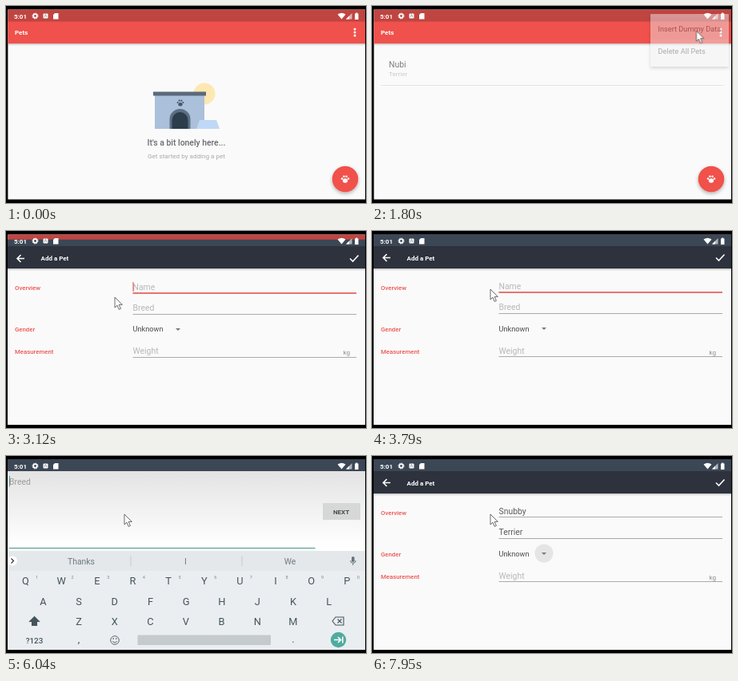
An HTML page that plays this animation: 450 by 247 pixels, repeating every 8000 ms.

```html
<!DOCTYPE html>
<html lang="en">
<head>
<meta charset="utf-8">
<title>Pets app</title>
<style>
html, body { margin: 0; width: 100%; height: 100%; overflow: hidden; background: #000; }
svg { display: block; width: 450px; height: 247px; font-family: Roboto, "Noto Sans", sans-serif; }
.s { font-size: 8.1px; }
.m { font-size: 9.2px; }
.l { font-size: 10.4px; }
.b { font-weight: 500; }
.bb { font-weight: 700; font-size: 8px; }
.mid { text-anchor: middle; }
.label { fill: #ec5652; font-size: 7.8px; font-weight: 500; }
.line { stroke: #aaa; stroke-width: 1; }
.icon { fill: none; stroke: #fff; stroke-width: 1.6; }
.key { font-size: 12.8px; fill: #46545c; text-anchor: middle; }

.anim { animation: 8s linear infinite both; }
#cursor { animation-name: cursor; }
#empty { animation-name: empty; }
#list { animation-name: list; }
#menu { animation-name: menu; }
.sheet { animation-name: sheet; transform-origin: 348px 10px; }
#items { animation-name: items; }
#tap { animation-name: tap; }
#press { animation-name: press; transform-origin: 424px 217px; }
#editor { animation-name: editor; }
#form { animation-name: form; }
#bar { animation-name: bar; transform-origin: 0 19px; }
#ime { animation-name: ime; }
#keys { animation-name: keys; }
#focus { animation-name: focus; transform-origin: 215px 122px; }

@keyframes cursor {
  0%, 1.62% { transform: translate(364px, 247px); animation-timing-function: ease-in-out; }
  7.63%, 10% { transform: translate(434px, 31px); }
  12.5% { transform: translate(426px, 35px); }
  19%, 21.5% { transform: translate(405px, 26px); animation-timing-function: ease-in-out; }
  30%, 32.2% { transform: translate(422px, 211px); animation-timing-function: ease-in-out; }
  39% { transform: translate(136px, 83px); }
  41.7% { transform: translate(143px, 76px); }
  42.9%, 100% { transform: translate(148px, 73px); }
}
@keyframes empty { 0%, 21.5% { opacity: 1; } 22.5%, 100% { opacity: 0; } }
@keyframes list { 0%, 21.5% { opacity: 0; } 23%, 100% { opacity: 1; } }
@keyframes menu {
  0%, 10% { opacity: 0; }
  12.4%, 21.5% { opacity: .96; }
  23.5%, 100% { opacity: 0; }
}
@keyframes sheet {
  0%, 10% { transform: translate(50px, 9px) scale(.5, .2); }
  12.5% { transform: translate(15px, 9px) scale(.867, .62); }
  15%, 100% { transform: none; }
}
@keyframes items { 0%, 12.5% { transform: translateY(-3px); } 15%, 100% { transform: none; } }
@keyframes tap { 0%, 17.5% { opacity: 0; } 19%, 21.5% { opacity: .1; } 23%, 100% { opacity: 0; } }
@keyframes press {
  0%, 31.5% { transform: scale(0); opacity: .25; }
  33.5% { transform: none; opacity: .25; }
  36%, 100% { transform: none; opacity: 0; }
}
@keyframes editor { 0%, 33% { opacity: 0; } 36%, 100% { opacity: 1; } }
@keyframes form {
  0%, 33% { transform: translateY(20px); animation-timing-function: ease-out; }
  36% { transform: translateY(5px); animation-timing-function: ease-out; }
  39% { transform: translateY(1px); }
  41.6%, 100% { transform: none; }
}
@keyframes bar { 0%, 36.5% { transform: scaleY(0); } 39% { transform: scaleY(.55); } 41.6%, 100% { transform: none; } }
@keyframes ime {
  0%, 49.2% { opacity: 0; }
  50.3% { opacity: .98; }
  51.1%, 96% { opacity: 1; }
  97.8%, 100% { opacity: 0; }
}
@keyframes keys {
  0%, 49.2% { transform: translateY(125px); }
  50.2%, 96% { transform: none; }
  98.5%, 100% { transform: translateY(125px); }
}
@keyframes focus {
  0%, 96.5% { transform: scale(.5); opacity: 0; }
  99%, 100% { transform: none; opacity: 1; }
}
</style>
</head>
<body>
<svg viewBox="0 0 450 247">
  <defs>
    <clipPath id="screen"><rect x="2.400" y="4.500" width="446.600" height="237.900"/></clipPath>
    <clipPath id="reveal"><rect class="anim sheet" x="348" y="10" width="98" height="66"/></clipPath>
    <linearGradient id="shade" x2="0" y2="1">
      <stop stop-opacity=".22"/><stop offset="1" stop-opacity="0"/>
    </linearGradient>
    <linearGradient id="page" x2="0" y2="1">
      <stop stop-color="#e3e3e3"/><stop offset=".9" stop-color="#fefefe"/>
    </linearGradient>
    <filter id="drop" x="-30%" y="-30%" width="160%" height="170%">
      <feDropShadow dx="0" dy="2" stdDeviation="2" flood-opacity=".3"/>
    </filter>
    <g id="paw">
      <ellipse cy="2" rx="3.1" ry="2.7"/>
      <circle cx="-4" cy="-.6" r="1.25"/><circle cx="-1.6" cy="-3.3" r="1.3"/>
      <circle cx="1.6" cy="-3.3" r="1.3"/><circle cx="4" cy="-.6" r="1.25"/>
    </g>
  </defs>

  <g clip-path="url(#screen)">
    <rect width="450" height="247" fill="#fafafa"/>
    <rect y="47" width="450" height="3" fill="url(#shade)"/>
    <rect y="19" width="450" height="28" fill="#f0514c"/>
    <text class="bb" x="11" y="36" fill="#fff">Pets</text>
    <g fill="#fff">
      <circle cx="436" cy="29" r="1.5"/><circle cx="436" cy="33" r="1.5"/><circle cx="436" cy="37" r="1.5"/>
    </g>

    <g id="empty" class="anim">
      <circle cx="248" cy="110" r="13.5" fill="#fde8b1"/>
      <path d="M186 112h62v42h-62z" fill="#abc0da"/>
      <path d="M184 107.500h66v5h-66z" fill="#5a6a7b"/>
      <path d="M204.500 154v-12a13 13 0 0 1 26 0v12z" fill="#5d6f82"/>
      <path d="M207.500 154v-11a10 10 0 0 1 20 0v11z" fill="#2c3d4c"/>
      <use href="#paw" transform="translate(218 121.500) scale(.85)" fill="#465768"/>
      <path d="M242 143h21l4 11h-29z" fill="#bfd8f5"/>
      <text class="mid b" x="225.500" y="175" font-size="10.4" fill="#6a6a70">It's a bit lonely here...</text>
      <text class="s mid" x="225.500" y="191" fill="#a9a9a9">Get started by adding a pet</text>
    </g>

    <g id="list" class="anim">
      <text class="l" x="21" y="76.500" fill="#444">Nubi</text>
      <text class="s" x="21" y="88" fill="#b4b4b4">Terrier</text>
      <path d="M11 99.500H440" stroke="#dcdcdc"/>
    </g>

    <circle cx="424" cy="217" r="16.3" fill="#f0514c" filter="url(#drop)"/>
    <use href="#paw" transform="translate(424 217)" fill="#fff"/>
    <circle id="press" class="anim" cx="424" cy="217" r="16.3" fill="#fff"/>

    <rect y="4" width="450" height="15" fill="#bf4541"/>

    <g id="editor" class="anim">
      <rect y="19" width="450" height="228" fill="#fafafa"/>
      <rect y="47" width="450" height="3" fill="url(#shade)"/>
      <rect y="19" width="450" height="28" fill="#2d323d"/>
      <g id="form" class="anim">
        <path class="icon" d="M23 33.500H14.500M18.500 29l-4.500 4.500 4.500 4.500"/>
        <text class="bb" x="43.500" y="36.500" fill="#fff">Add a Pet</text>
        <path class="icon" d="M430 33.500l3.500 3.500 7-7.500"/>
        <text class="label" x="11" y="73.500">Overview</text>
        <text class="label" x="11" y="125.500">Gender</text>
        <text class="label" x="11" y="153.500">Measurement</text>
        <text id="name" class="l" x="158.500" y="73"></text>
        <path class="line" d="M158.500 76.500H438"/>
        <path id="nameLine" d="M158.500 77H438" stroke="#ef5350" stroke-width="1.4"/>
        <path id="nameCaret" d="M159 63v12" stroke="#d94a46"/>
        <text id="breed" class="l" x="158.500" y="99"></text>
        <path class="line" d="M158.500 103.500H438"/>
        <circle id="focus" class="anim" cx="215" cy="122" r="11.5" fill="#e5e5e5"/>
        <text class="m" x="158.500" y="125.500" fill="#4c4c4c">Unknown</text>
        <path d="M212 121h6l-3 3z" fill="#777"/>
        <text class="l" x="158.500" y="153.500" fill="#b8b8b8">Weight</text>
        <text class="s" x="421.500" y="154.500" fill="#8c8c8c">kg</text>
        <path class="line" d="M158.500 157.500H438"/>
      </g>
    </g>
    <rect id="bar" class="anim" y="4" width="450" height="15" fill="#3c4755"/>

    <g id="ime" class="anim">
      <rect y="19" width="450" height="100" fill="url(#page)"/>
      <rect y="119" width="450" height="125" fill="#eaeef1"/>
      <text id="entry" class="l" x="4" y="36"></text>
      <path id="caret" d="M0 25v13.500" stroke="#4f9f93"/>
      <path d="M4 115.500H386.500" stroke="#459488"/>
      <rect x="396" y="59" width="47" height="21" rx="1" fill="#d6d8d8"/>
      <text class="bb mid" x="419" y="72.500" fill="#4a4a4a">NEXT</text>
    </g>
    <g id="keys" class="anim">
      <rect y="119" width="450" height="125" fill="#eaeef1"/>
      <rect y="119" width="450" height="25" fill="#e4e8eb"/>
      <path d="M156 125v13M295 125v13" stroke="#c6ccd0"/>
      <circle cx="8" cy="131.500" r="6" fill="#fff"/>
      <path d="M6.500 128.500l3 3-3 3" fill="none" stroke="#333" stroke-width="1.2"/>
      <rect x="432" y="126" width="3.6" height="7" rx="1.8" fill="#66747c"/>
      <path d="M430.500 131a3.300 3.300 0 0 0 6.600 0M433.800 134.500v2.500" fill="none" stroke="#66747c"/>
      <path id="shift" d="M35.500 201.500l6 6h-3v5h-6v-5h-3z" stroke="#46545c" stroke-width="1.1"/>
      <path d="M408 207l4-5h10v10h-10zM414.500 204.500l5 5M419.500 204.500l-5 5" fill="none" stroke="#46545c" stroke-width="1.1"/>
      <text class="mid b" x="35.500" y="234.500" font-size="9.8" fill="#46545c">?123</text>
      <text class="key" x="91" y="234">,</text>
      <text class="key" x="359" y="234">.</text>
      <g fill="none" stroke="#5b6970">
        <circle cx="136" cy="231" r="5.3"/><path d="M133 232.500q3 3 6 0"/>
      </g>
      <path d="M133.500 229h1.500M137 229h1.500" stroke="#5b6970" stroke-width="1.4"/>
      <rect x="164.500" y="224.500" width="166.500" height="12.500" rx="1" fill="#c5cacd"/>
      <circle cx="415.500" cy="230.500" r="9.7" fill="#50ab9f"/>
      <path class="icon" d="M410 230.500h8M415 227l3.500 3.500-3.500 3.500M420.800 226.500v8"/>
    </g>

    <g fill="#fff">
      <text class="bb" x="10" y="15.500">5:01</text>
      <circle cx="36.500" cy="12.500" r="2.3" fill="none" stroke="#fff" stroke-width="1.8"/>
      <circle cx="36.500" cy="12.500" r="3.500" fill="none" stroke="#fff" stroke-dasharray="1.4 1.35"/>
      <rect x="46.500" y="9.500" width="6" height="6" rx="1"/>
      <path d="M48 14l1.500-3.500L51 14" fill="none" stroke="#888" stroke-width=".8"/>
      <path d="M61 9h4.500v7.500h-6.500v-5.500z"/>
      <path d="M414.500 10.500q5-3.500 10 0l-5 6z"/>
      <path d="M432.500 9v7.500H425z" opacity=".6"/><path d="M429 12.500v4h-4z"/>
      <path d="M436 9.500h1.200v-1h2.100v1h1.200v7.500h-4.500z"/>
    </g>

    <g id="menu" class="anim">
      <rect class="anim sheet" x="348" y="10" width="98" height="66" fill="#f5f2f2" filter="url(#drop)"/>
      <g clip-path="url(#reveal)">
        <rect id="tap" class="anim" x="348" y="14" width="98" height="28"/>
        <g id="items" class="anim" fill="#555">
          <text class="m" x="357.500" y="32">Insert Dummy Data</text>
          <text class="m" x="357.500" y="60">Delete All Pets</text>
        </g>
      </g>
    </g>
  </g>
  <path id="cursor" class="anim" d="M0 0V13L3 10.200 5.200 15.400 7.400 14.400 5.200 9.400H9.300Z" fill="#fff" stroke="#444" stroke-width=".8"/>
</svg>
<script>
const $ = id => document.getElementById(id);

function addText(cls, x, y, text) {
  const el = document.createElementNS('http://www.w3.org/2000/svg', 'text');
  el.setAttribute('class', cls);
  el.setAttribute('x', x);
  el.setAttribute('y', y);
  el.textContent = text;
  $('keys').append(el);
  return el;
}

// Keyboard: [letters, first x, baseline]
const letters = [];
for (const [row, x, y] of [['qwertyuiop', 24.5, 161], ['asdfghjkl', 46.5, 186.5], ['zxcvbnm', 91, 211.5]])
  [...row].forEach((c, i) => letters.push(addText('key', x + i * 44.65, y, c)));
for (let i = 0; i < 10; i++) {
  const digit = addText('mid', 38.5 + i * 44.65, 153.5, (i + 1) % 10);
  digit.setAttribute('font-size', 5.6);
  digit.setAttribute('fill', '#7d8990');
}
const chips = [94, 224.5, 355].map(x => {
  const chip = addText('l mid', x, 135.5, '');
  chip.setAttribute('fill', '#6c7a82');
  return chip;
});

const nameField = {
  word: 'Snubby', hint: 'Name',
  times: [3790, 4240, 4590, 4710, 4910, 5090],
  tips: ['', 'S So Sorry', 'Sn Snow Snap', 'Snu Snug Snub', 'Snub Snubs Snug', 'Snubb Snubs Snub', 'Snubby Snubs Snug']
};
const breedField = {
  word: 'Terrier', hint: 'Breed',
  times: [6540, 6690, 6790, 6940, 7020, 7130, 7250],
  tips: ['Thanks I We', 'T The This', 'Te Tell Ten', 'Ter Term Terms', 'Terr Terry Terror',
    'Terri Terrier Terrible', 'Terrie Terrier Terriers', 'Terrier Terriers Terrain']
};

const setText = (el, text) => { if (el.textContent !== text) el.textContent = text; };
const show = (el, on) => el.setAttribute('visibility', on ? 'visible' : 'hidden');

function fill(el, field, count, hintColor) {
  setText(el, count ? field.word.slice(0, count) : field.hint);
  el.setAttribute('fill', count ? '#5c5c5c' : hintColor);
}

function draw(t) {
  const count = field => field.times.filter(s => t >= s).length;
  const second = t >= 5560;
  const field = second ? breedField : nameField;
  const n = count(field);
  const caps = second && !n;

  fill($('name'), nameField, count(nameField), '#b8b8b8');
  fill($('breed'), breedField, count(breedField), '#b8b8b8');
  show($('nameLine'), !second);
  show($('nameCaret'), t < 3430);

  fill($('entry'), field, n, '#9c9c9c');
  const x = n ? 4.5 + $('entry').getComputedTextLength() : 4.5;
  $('caret').setAttribute('transform', `translate(${x} 0)`);
  show($('caret'), t < 6040 || t >= 6540);

  const tips = field.tips[n].split(' ');
  chips.forEach((chip, i) => setText(chip, tips[i] || ''));
  letters.forEach(k => setText(k, caps ? k.textContent.toUpperCase() : k.textContent.toLowerCase()));
  $('shift').setAttribute('fill', caps ? '#46545c' : 'none');
}

// Read the CSS clock so typing stays in step with the keyframes;
// the small lead covers the delay of one screen refresh
const clock = $('cursor').getAnimations()[0];
const lead = 20;
function tick() {
  draw((clock.currentTime || 0) % 8000 + lead);
  requestAnimationFrame(tick);
}
tick();
</script>
</body>
</html>
```
